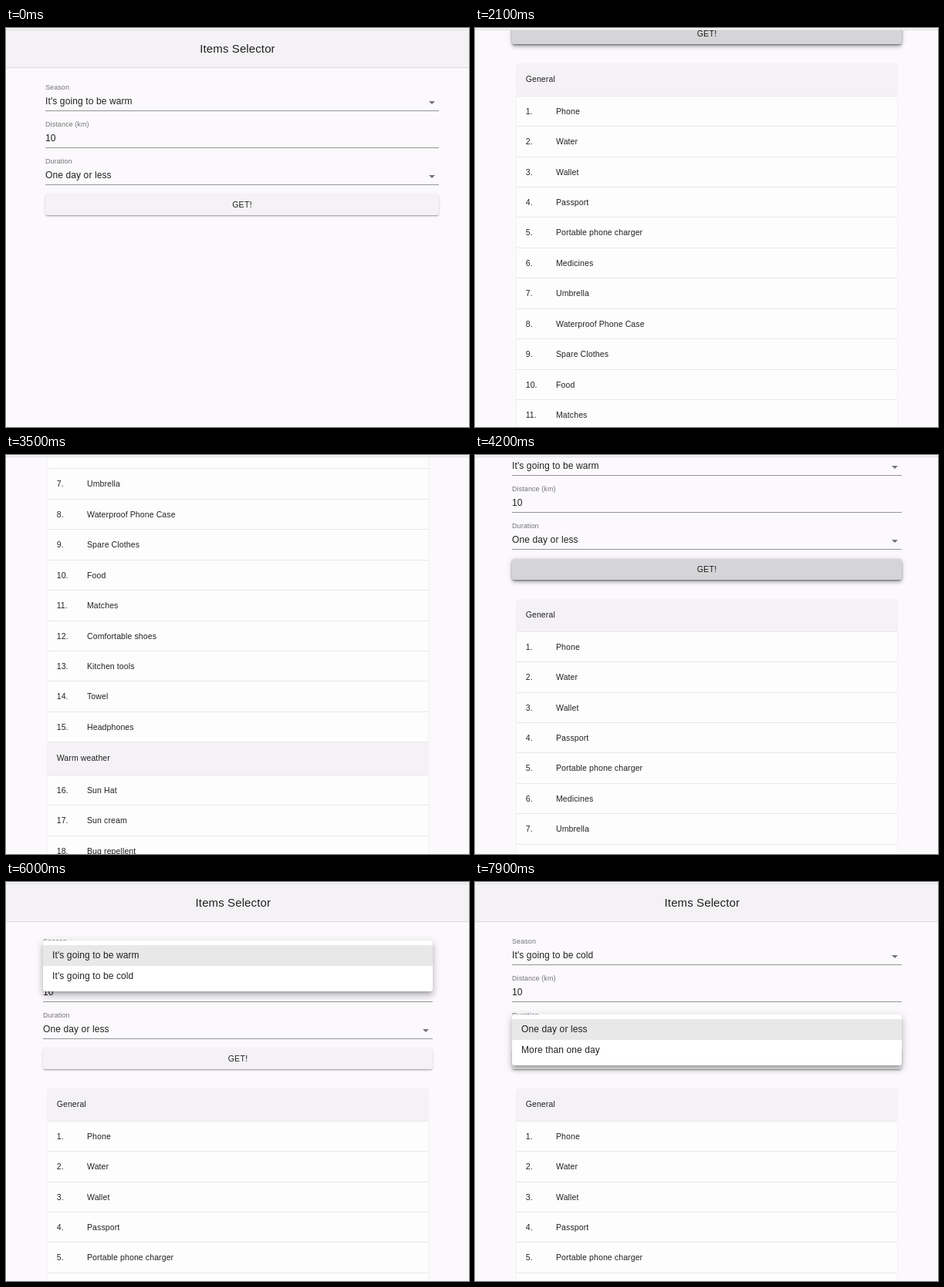
An HTML page that plays this animation: 600 px wide and 518 px high, repeating every 8000 ms.

```html
<!DOCTYPE html>
<html lang="en">
<head>
<meta charset="utf-8">
<title>Items Selector</title>
<style>
html, body { margin: 0; width: 100%; height: 100%; overflow: hidden; background: #fbf9fc; }
body { position: relative; font-family: "Liberation Sans", Arial, sans-serif; color: rgba(0,0,0,.87); white-space: nowrap; }
div { position: absolute; box-sizing: border-box; }
#chrome { left: 0; top: 0; width: 100%; height: 3px; background: #f5f4f6; border-bottom: 1px solid #dddce0; }
#page { left: 0; top: 0; width: 600px; height: 1200px; }
#bar { top: 3px; width: 600px; height: 49px; background: #f4f2f5; border-bottom: 1px solid #dcdade; }
#title { width: 600px; top: 12px; line-height: 24px; font-size: 15px; letter-spacing: .0075em; text-align: center; }
.field { width: 100%; height: 36px; }
.label { top: 0; font-size: 9px; line-height: 11px; letter-spacing: .00938em; color: rgba(0,0,0,.54); }
.value { top: 12px; width: 100%; height: 24px; font-size: 12px; line-height: 23px; letter-spacing: .00938em; }
.line { bottom: 0; width: 100%; height: 1px; background: #949395; }
.arrow { right: 5px; top: 22.5px; border: solid transparent; border-width: 4px 4px 0; border-top-color: rgba(0,0,0,.54); }
.hover .line { height: 2px; background: #252426; }
.focus .label { color: #3f51b5; }
.focus .value { background: rgba(0,0,0,.06); }
.focus .line { height: 2px; background: #4d58a8; }
#spin { right: 0; top: 16px; width: 12px; height: 15px; background: #efeef0; visibility: hidden; }
.hover #spin { visibility: visible; }
#spin::before, #spin::after { content: ""; position: absolute; left: 3px; border: solid transparent; border-width: 3px; }
#spin::before { top: 0; border-bottom-color: #444; }
#spin::after { bottom: 0; border-top-color: #444; }
#button, #hot { width: 100%; height: 27px; border-radius: 3px; }
#button { top: 215.5px; background: #f4f2f5; font-size: 10.5px; line-height: 27px; letter-spacing: .02857em; text-align: center;
  box-shadow: 0 2.25px .75px -1.5px rgba(0,0,0,.2), 0 1.5px 1.5px rgba(0,0,0,.14), 0 .75px 3.75px rgba(0,0,0,.12); }
#hot { background: #d5d4d6;
  box-shadow: 0 2px 4px -1px rgba(0,0,0,.2), 0 4px 5px rgba(0,0,0,.14), 0 1px 10px rgba(0,0,0,.12); }
#button span { position: relative; }
#button.flat, .flat #hot { box-shadow: none; }
#table, #shade { left: 53.5px; top: 268.3px; width: 493.5px; border-radius: 3px; }
#table { background: #fefdfe; overflow: hidden; font-size: 10.5px; letter-spacing: .01071em; }
#shade { height: 860px;
  box-shadow: 0 1.5px .75px -.75px rgba(0,0,0,.12), 0 .75px .75px rgba(0,0,0,.1), 0 .75px 2.25px rgba(0,0,0,.1); }
.row, .head { position: relative; height: 39.45px; line-height: 38.6px; border-bottom: 1px solid #e9e7ea; padding-left: 12.2px; }
.head { height: 42.4px; line-height: 41.6px; background: #f4f2f5; }
.row span { position: absolute; left: 51.5px; }
.menu { width: 100%; height: 66px; padding: 6px 0; background: #fff; border-radius: 3px; transform-origin: 0 28px;
  font-size: 12px; line-height: 27px; letter-spacing: .00938em;
  box-shadow: 0 3.75px 3.75px -2.25px rgba(0,0,0,.2), 0 6px 7.5px .75px rgba(0,0,0,.14), 0 2.25px 10.5px 1.5px rgba(0,0,0,.12); }
.item { position: relative; height: 27px; padding-left: 12px; }
.item.on { background: #e9e8e9; }
.item.over { background: #f4f4f4; }
</style>
</head>
<body>
<div id="page">
  <div id="bar"><div id="title">Items Selector</div></div>
  <div id="results"><div id="shade"></div><div id="table"></div></div>
  <div id="form">
    <div class="field" id="season" style="top:72px"><div class="label">Season</div><div class="value"></div><div class="arrow"></div><div class="line"></div></div>
    <div class="field" id="distance" style="top:120px"><div class="label">Distance (km)</div><div class="value">10</div><div id="spin"></div><div class="line"></div></div>
    <div class="field" id="duration" style="top:168px"><div class="label">Duration</div><div class="value">One day or less</div><div class="arrow"></div><div class="line"></div></div>
    <div id="button"><div id="hot"></div><span>GET!</span></div>
    <div class="menu" id="seasonMenu" style="top:76px"><div class="item">It's going to be warm</div><div class="item">It's going to be cold</div></div>
    <div class="menu" id="durationMenu" style="top:172px"><div class="item on">One day or less</div><div class="item">More than one day</div></div>
  </div>
</div>
<div id="chrome"></div>
<script>
const LOOP = 8000, GROW = 218;
const SHOW = 1000, OPEN = 5570, PICK = 6775, OPEN2 = 7560;
const $ = id => document.getElementById(id);

const sections = {
  'General': ['Phone', 'Water', 'Wallet', 'Passport', 'Portable phone charger', 'Medicines', 'Umbrella',
    'Waterproof Phone Case', 'Spare Clothes', 'Food', 'Matches', 'Comfortable shoes', 'Kitchen tools', 'Towel', 'Headphones'],
  'Warm weather': ['Sun Hat', 'Sun cream', 'Bug repellent']
};
let count = 0;
$('table').innerHTML = Object.entries(sections).map(([name, items]) =>
  `<div class="head">${name}</div>` +
  items.map(item => `<div class="row">${++count}.<span>${item}</span></div>`).join('')).join('');

const within = (t, a, b) => t >= a && t < b;

// cubic-bezier(.4, 0, .2, 1) started at a, lasting d
function ease(t, a, d) {
  const x = Math.min(1, Math.max(0, (t - a) / d));
  let lo = 0, hi = 1;
  for (let i = 0; i < 20; i++) {
    const s = (lo + hi) / 2, r = 1 - s;
    if (1.2 * r * r * s + .6 * r * s * s + s * s * s < x) lo = s; else hi = s;
  }
  return lo * lo * (3 - 2 * lo);
}

const scrollKeys = [[1700, 0], [1900, 90], [2100, 222], [2400, 300], [2700, 345], [3100, 450], [3500, 529], [3600, 529], [3800, 410], [4300, 0]];
function scrollAt(t) {
  const i = scrollKeys.findIndex(k => k[0] > t);
  if (i < 1) return 0;
  const [[a, y], [b, z]] = [scrollKeys[i - 1], scrollKeys[i]];
  return y + (z - y) * (t - a) / (b - a);
}

function drawMenu(menu, t, open, close) {
  const closing = t >= close;
  const alpha = closing ? 1 - ease(t, close, GROW) : ease(t, open, GROW);
  const grow = closing ? 1 - ease(t, close + GROW / 3, GROW * 2 / 3) : ease(t, open, GROW * 2 / 3);
  menu.style.visibility = alpha > .001 ? 'visible' : 'hidden';
  menu.style.opacity = alpha;
  menu.style.transform = `scale(${.75 + .25 * grow}, ${.5625 + .4375 * grow})`;
}

function draw(t) {
  const shown = t >= SHOW, cold = t >= PICK;
  $('page').style.transform = `translateY(${-Math.round(scrollAt(t))}px)`;
  $('title').style.left = (shown ? -5.7 : 0) + 'px';
  $('form').style.left = (shown ? 48 : 51) + 'px';
  $('form').style.width = (shown ? 505 : 510) + 'px';
  $('results').style.display = shown ? 'block' : 'none';

  $('hot').style.opacity = ease(t, 550, 250) - ease(t, 4400, 250);
  $('button').classList.toggle('flat', within(t, SHOW, 1500));

  $('season').classList.toggle('hover', within(t, 5350, OPEN));
  $('season').classList.toggle('focus', within(t, PICK, OPEN2));
  $('distance').classList.toggle('hover', within(t, 5000, 5330));
  $('duration').classList.toggle('hover', within(t, 4700, 4950) || within(t, 7450, OPEN2));
  $('season').children[1].textContent = `It's going to be ${cold ? 'cold' : 'warm'}`;

  const [warmItem, coldItem] = $('seasonMenu').children;
  warmItem.classList.toggle('on', !cold);
  coldItem.classList.toggle('on', cold);
  coldItem.classList.toggle('over', within(t, 6050, PICK));
  drawMenu($('seasonMenu'), t, OPEN, PICK);
  drawMenu($('durationMenu'), t, OPEN2, LOOP);
}

const start = performance.now();
function tick() {
  draw((performance.now() - start) % LOOP);
  requestAnimationFrame(tick);
}
tick();
</script>
</body>
</html>
```
